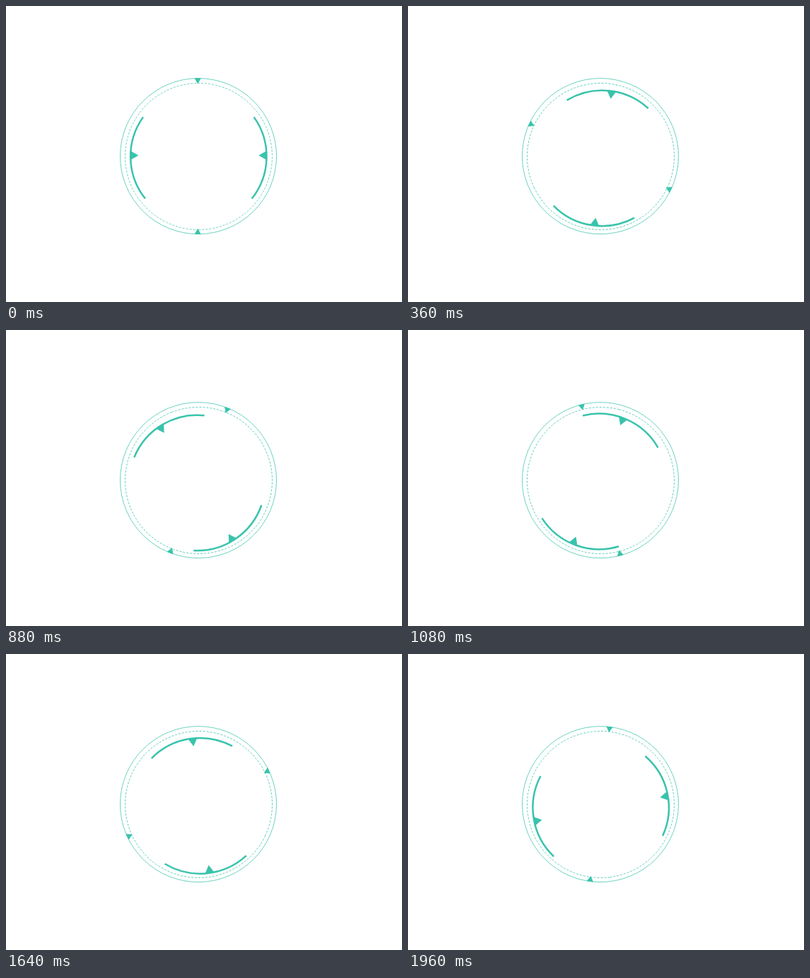
Write an HTML page with a canvas that moves like this. It is 560 px wide and 420 px high and loops after 2000 ms.

```html
<!DOCTYPE html>
<html lang="en">
<head>
<meta charset="utf-8">
<title>Rotating dial</title>
<style>
html, body { margin: 0; width: 100%; height: 100%; overflow: hidden; background: #fff; }
canvas { display: block; width: 560px; height: 420px; }
</style>
</head>
<body>
<canvas id="stage" width="560" height="420"></canvas>
<script>
const ctx = document.getElementById('stage').getContext('2d');
const LOOP = 2000, STEP = 40;
const THIN = 0.75, THICK = 2.5;
const PIVOT = 2.2; // the arms turn around a point just below their centre
const rad = deg => deg * Math.PI / 180;

function spun(x, y, deg, draw) {
  ctx.save();
  ctx.translate(x, y);
  ctx.rotate(rad(deg));
  draw();
  ctx.restore();
}

function arc(r, from, to, width, dash = []) {
  ctx.lineWidth = width;
  ctx.setLineDash(dash);
  ctx.beginPath();
  ctx.arc(0, 0, r, rad(from), rad(to));
  ctx.stroke();
}

function triangle(...pts) {
  ctx.beginPath();
  pts.forEach(([x, y]) => ctx.lineTo(x, y));
  ctx.closePath();
  ctx.fill();
}

function markers() {
  for (const s of [-1, 1]) {
    triangle([-5.5, s * 110.8], [3.9, s * 110.8], [-0.8, s * 102.7]);
  }
}

function arms() {
  ctx.translate(0, -PIVOT);
  arc(96.2, -35.5, 38.4, THICK);
  arc(96.2, 141.6, 215.5, THICK);
  for (const s of [-1, 1]) {
    triangle([s * 96.2, -8], [s * 96.2, 5], [s * 85, -1.5]);
  }
}

function render(t) {
  ctx.fillStyle = '#fff';
  ctx.fillRect(0, 0, 560, 420);
  ctx.fillStyle = ctx.strokeStyle = '#39c3ac';
  spun(272, 213.1, 0, () => arc(110.5, 0, 360, THIN));
  spun(272.5, 213.5, t * 0.18, () => arc(104, 90, 450, THIN, [3, 2]));
  spun(272, 213.1, -t * 0.18, markers);
  spun(272.3, 213.5 + PIVOT, t * 0.27, arms);
}

const start = performance.now();
function tick() {
  const t = (performance.now() - start) % LOOP;
  render(Math.floor(t / STEP) * STEP);
  requestAnimationFrame(tick);
}
tick();
</script>
</body>
</html>
```
